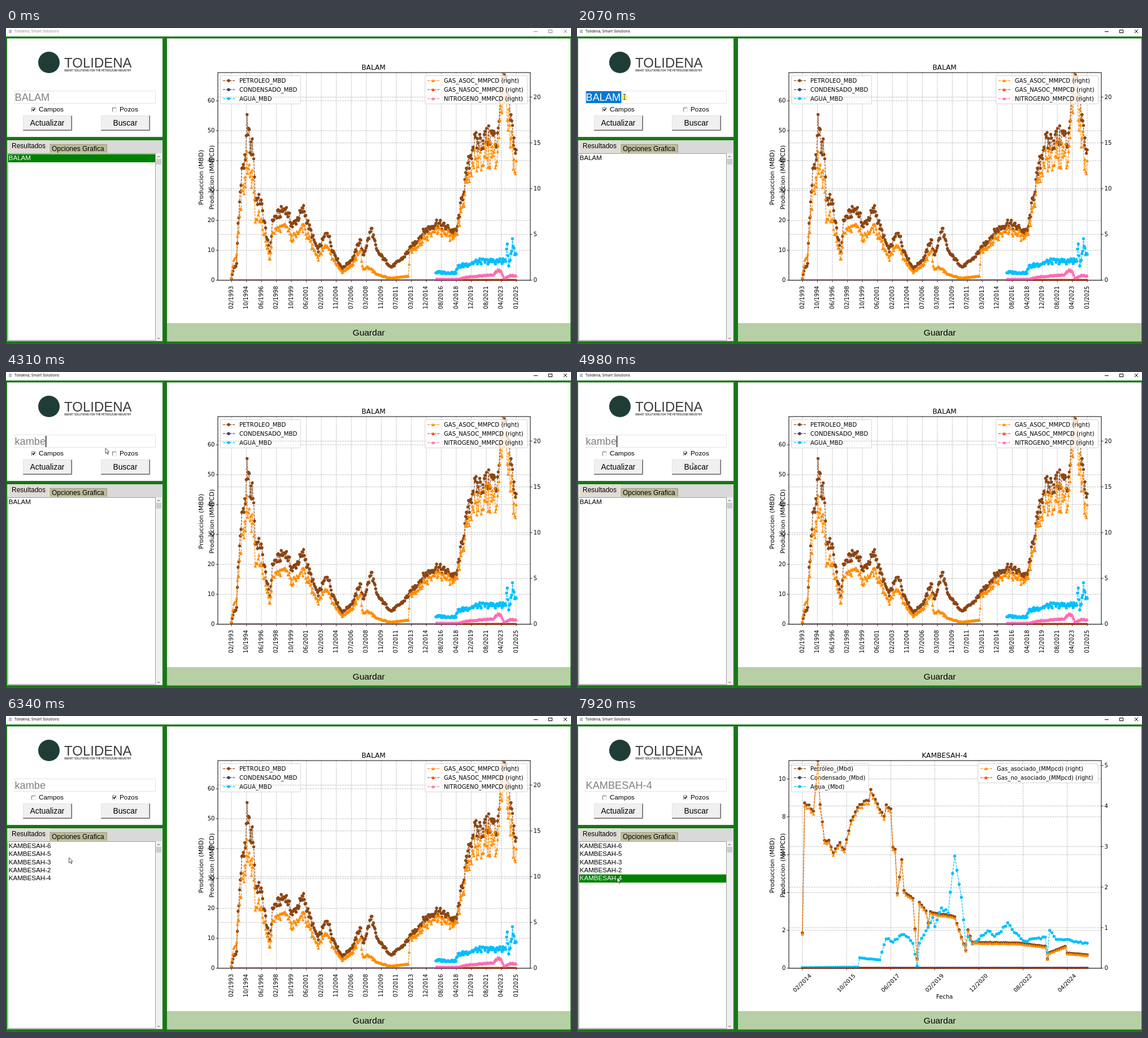
An HTML page with a canvas that plays this animation: 1000 px wide and 560 px high, repeating every 8 s.

```html
<!DOCTYPE html>
<html lang="es">
<head>
<meta charset="utf-8">
<style>
html, body { margin: 0; width: 100%; height: 100%; overflow: hidden; background: #fff; }
canvas { display: block; width: 1000px; height: 560px; }
</style>
</head>
<body>
<canvas id="stage" width="1000" height="560"></canvas>
<script>
const c = document.getElementById('stage').getContext('2d');
const LOOP = 8000, L = 375, R = 928, T = 79, B = 447, X0 = 399, SPAN = 504;
const UI = '"Liberation Sans", Arial, sans-serif', PLOT = '"DejaVu Sans", sans-serif';
const BROWN = '#8b4513', NAVY = '#483d6b', CYAN = '#00bfff', ORANGE = '#ff8c00', RED = '#ff4500', PINK = '#ff69b4';

function rect(x, y, w, h, fill) { c.fillStyle = fill; c.fillRect(x, y, w, h); }
function frame(x, y, w, h, color) { c.strokeStyle = color; c.lineWidth = 1; c.strokeRect(x + .5, y + .5, w - 1, h - 1); }
function disc(x, y, r, fill) { c.fillStyle = fill; c.beginPath(); c.arc(x, y, r, 0, 7); c.fill(); }
function line(points, color, width = 1, dash = []) {
  c.strokeStyle = color; c.lineWidth = width; c.setLineDash(dash);
  c.beginPath(); points.forEach(p => c.lineTo(p[0], p[1])); c.stroke(); c.setLineDash([]);
}
function text(s, x, y, size, { color = '#000', font = UI, align = 'left', weight = '', turn = 0 } = {}) {
  c.save(); c.translate(x, y); c.rotate(turn);
  c.font = `${weight} ${size}px ${font}`; c.fillStyle = color;
  c.textAlign = align; c.textBaseline = 'middle';
  c.fillText(s, 0, 0); c.restore();
}
const plotText = (s, x, y, size, align, turn) => text(s, x, y + .8, size, { font: PLOT, align, turn });

// Value in column n of sorted keys, linear between them
function at(keys, x, n = 1) {
  const i = keys.findIndex(k => k[0] >= x);
  if (i < 0) return keys[keys.length - 1][n];
  if (i === 0) return keys[0][n];
  const a = keys[i - 1], b = keys[i];
  return a[n] + (b[n] - a[n]) * (x - a[0]) / (b[0] - a[0]);
}
const noise = (i, seed) => { const v = Math.sin(i * 12.9898 + seed * 78.233) * 43758.5453; return v - Math.floor(v) - .5; };
const months = n => Array.from({ length: n }, (_, i) => X0 + i * SPAN / (n - 1));
const scatter = (xs, height, seed, rough) => xs.map((x, i) => [x, B - height(x, i) * (1 + rough * noise(i, seed))]);
const zero = xs => xs.map(x => [x, B]);

// Field: heights in px above the axis by x
const fieldTrend = [[399, 3], [403, 23], [408, 24], [411, 105], [419, 208], [424, 206], [427, 288], [432, 235], [438, 235],
  [441, 145], [451, 140], [467, 45], [472, 108], [495, 128], [507, 96], [527, 126], [535, 98], [552, 52], [569, 88], [577, 56],
  [595, 20], [615, 40], [627, 74], [632, 42], [647, 92], [656, 52], [682, 23], [703, 40], [740, 86], [762, 102], [797, 84],
  [810, 162], [826, 240], [862, 258], [868, 240], [880, 372], [891, 300], [903, 221]];
const gasShare = [[408, 1.6], [411, .78], [628, .74], [630, .5], [646, .22], [683, .17], [713, .15], [714, .88]];
const waterTrend = [[760, 14], [796, 13], [800, 24], [835, 33], [884, 34], [887, 58], [890, 27], [897, 69], [900, 45], [903, 48]];
const nitroTrend = [[760, 2], [800, 2], [815, 6], [862, 10], [870, 19], [877, 15], [881, 4], [893, 9], [903, 8]];
const all = months(384), late = all.filter(x => x >= 760);
const oil1 = scatter(all, x => at(fieldTrend, x), 1, .16);
const gas1 = scatter(all, (x, i) => (B - oil1[i][1]) * at(gasShare, x), 2, .13);

// Well: heights by month number
const wellTrend = [[0, 63], [1, 295], [5, 280], [7, 365], [8, 289], [10, 225], [12, 225], [14, 205], [17, 223], [19, 209], [22, 260],
  [26, 291], [30, 296], [31, 314], [37, 267], [38, 287], [40, 285], [41, 213], [42, 211], [43, 134], [45, 191], [46, 137], [50, 123],
  [52, 17], [53, 117], [56, 102], [57, 80], [58, 100], [69, 91], [74, 32], [75, 68], [77, 46], [97, 45], [110, 39], [111, 17],
  [112, 28], [119, 39], [120, 27], [129, 24]];
const seepTrend = [[0, 1], [25, 2], [26, 18], [35, 15], [38, 53], [41, 47], [46, 61], [50, 45], [52, 4], [53, 44], [59, 89], [60, 73],
  [63, 108], [66, 98], [69, 202], [72, 125], [74, 42], [75, 57], [77, 42], [84, 68], [87, 55], [93, 78], [100, 48], [110, 55],
  [111, 28], [112, 66], [115, 53], [129, 44]];
const wellMonths = months(130);
const oil2 = scatter(wellMonths, (x, i) => at(wellTrend, i), 5, .02);
const gas2 = oil2.map(([x, y]) => [x, B - (B - y) * .985 + 1]);

// Labels 20 records apart; each slip is a month without a record
function dates(count, year, slips) {
  return Array.from({ length: count }, (_, k) => {
    const m = 1 + 20 * k + slips.filter(s => k >= s).length;
    return String(m % 12 + 1).padStart(2, '0') + '/' + (year + Math.floor(m / 12));
  });
}

const field = {
  title: 'BALAM', left: [10, 5.3, 60], right: [5, 16.23, 20], turn: -Math.PI / 2, dateY: 477, gap: 26.53,
  dates: dates(20, 1993, [7, 13, 19]),
  series: [['PETROLEO_MBD', BROWN, oil1], ['CONDENSADO_MBD', NAVY, []],
    ['AGUA_MBD', CYAN, scatter(late, x => at(waterTrend, x), 3, .3)]],
  series2: [['GAS_ASOC_MMPCD (right)', ORANGE, gas1], ['GAS_NASOC_MMPCD (right)', RED, zero(late.filter(x => x > 785))],
    ['NITROGENO_MMPCD (right)', PINK, scatter(late, x => at(nitroTrend, x), 4, .25)]],
  legend: [379, 142], legend2: [741, 181], idle: true
};
const well = {
  title: 'KAMBESAH-4', left: [2, 33.55, 10], right: [1, 71.9, 5], turn: -Math.PI / 4, dateY: 473, gap: 78.1,
  dates: dates(7, 2014, [4, 4]), xlabel: 'Fecha',
  series: [['Petróleo_(Mbd)', BROWN, oil2], ['Condensado_(Mbd)', NAVY, zero(wellMonths)],
    ['Agua_(Mbd)', CYAN, scatter(wellMonths, (x, i) => at(seepTrend, i), 6, .07)]],
  series2: [['Gas_asociado_(MMpcd) (right)', ORANGE, gas2], ['Gas_no_asociado_(MMpcd) (right)', RED, zero(wellMonths)]],
  legend: [379, 137], legend2: [709, 213]
};

function marker(x, y, color, triangle) {
  if (!triangle) return disc(x, y, 2.7, color);
  c.fillStyle = color; c.beginPath();
  c.moveTo(x, y - 2.9); c.lineTo(x + 2.9, y + 2.7); c.lineTo(x - 2.9, y + 2.7); c.fill();
}
function plot(series, triangle) {
  c.save(); c.beginPath(); c.rect(L, T, R - L, B - T + 1); c.clip();
  for (const [, color, points] of series) {
    line(points, color, 1.2, [4, 1.7]);
    points.forEach(p => marker(p[0], p[1], color, triangle));
  }
  c.restore();
}
function legend([x, w], series, triangle) {
  c.beginPath(); c.roundRect(x + .5, 84.5, w, series.length * 16 + 2, 2);
  c.fillStyle = 'rgba(255,255,255,.8)'; c.fill();
  c.strokeStyle = 'rgba(204,204,204,.8)'; c.lineWidth = 1; c.stroke();
  series.forEach(([name, color], i) => {
    const y = 93.3 + 15.9 * i;
    line([[x + 5, y], [x + 26, y]], color, 1.2, [4, 1.7]);
    marker(x + 15, y, color, triangle);
    plotText(name, x + 34, y, 10.15);
  });
}
function axis([step, scale, max], edge, side, align) {
  for (let v = 0; v <= max; v += step) {
    const y = B - v * scale;
    line([[L, y], [R, y]], '#b0b0b0', .8, [3, 1.4]);
    line([[edge, y], [edge + 3.5 * side, y]], '#000', .8);
    plotText(v, edge + 5.5 * side, y, 10.1, align);
  }
}
function chart(d) {
  d.dates.forEach((s, i) => {
    const x = X0 + d.gap * i;
    line([[x, B], [x, T]], '#b0b0b0', .8, [3, 1.4]);
    line([[x, B], [x, B + 3.5]], '#000', .8);
    plotText(s, x, d.dateY, 9.9, 'center', d.turn);
  });
  axis(d.left, L, -1, 'right');
  if (d.idle) {
    line([[X0, 445.5], [X0 + SPAN, 445.5]], '#8d9cc0');
    line([[X0, 446.5], [760, 446.5]], PINK);
  }
  plot(d.series, false);
  legend(d.legend, d.series, false);
  axis(d.right, R, 1, 'left');
  plot(d.series2, true);
  frame(L - .5, T - .5, R - L + 1, B - T + 1, '#000');
  legend(d.legend2, d.series2, true);
  plotText(d.title, 650.5, 70.3, 12.2, 'center');
  plotText('Produccion (MBD)', 346, 264, 11, 'center', -Math.PI / 2);
  plotText('Produccion (MMPCD)', 365, 264, 11, 'center', -Math.PI / 2);
  if (d.xlabel) plotText(d.xlabel, 650.5, 498, 10.1, 'center');
}

function button(x, label, down) {
  rect(x, 155, 87, 27, '#f0f0f0');
  frame(x, 155, 87, 27, down ? '#696969' : '#e3e3e3');
  line([[x, 181.5], [x + 86.5, 181.5], [x + 86.5, 155]], down ? '#fff' : '#696969');
  line([[x + 1, 180.5], [x + 85.5, 180.5], [x + 85.5, 156]], down ? '#e3e3e3' : '#a0a0a0');
  const shift = down ? 1 : 0;
  text(label, x + 43 + shift, 169 + shift, 13.9, { align: 'center' });
}
function check(x, label, on) {
  rect(x, 141, 8, 8, '#fff');
  line([[x + .5, 148], [x + .5, 141.5], [x + 7, 141.5]], '#696969');
  line([[x + 1, 148.5], [x + 7.5, 148.5], [x + 7.5, 141]], '#e3e3e3');
  if (on) line([[x + 2, 144], [x + 3.5, 146.3], [x + 6.5, 142.8]], '#000', 1.4);
  text(label, x + 13, 145.2, 11.8);
}

function titleBar(t) {
  const color = t < 1940 ? '#8a8a8a' : '#000';
  rect(0, 0, 1000, 15, '#fff');
  rect(5, 3, 5, 6, '#b4c0cc');
  text('Tolidena, Smart Solutions', 15, 6.2, 6.7, { color, font: '"Open Sans", sans-serif' });
  line([[934, 6.5], [941, 6.5]], color);
  frame(960, 3, 7, 6, color);
  line([[987, 3], [993, 9]], color);
  line([[993, 3], [987, 9]], color);
}

function entry(t) {
  const typed = [3070, 3110, 3180, 3440, 3580].filter(k => t >= k).length;
  const selected = t >= 2070 && t < 3070;
  const value = t >= 7920 ? 'KAMBESAH-4' : typed ? 'kambe'.slice(0, typed) : 'BALAM';
  rect(15, 111, 250, 23, '#fff');
  frame(15, 111, 250, 23, '#e3e3e3');
  if (selected) rect(16, 112, 62.5, 21, '#0078d7');
  text(value, 15.5, 124, 18.2, { color: selected ? '#fff' : '#808080' });
  c.font = `18.2px ${UI}`;
  const end = 15.5 + c.measureText(value).width;
  if (t >= 2140 && t < 5530 && (t - 2140) % 900 < 600) rect(Math.round(end), 113, 1.3, 20, '#000');
}

function results(t) {
  rect(2, 199, 275, 356, '#d9d9d9');
  rect(4, 199, 72, 22, '#e0dcd5');
  line([[4.5, 221], [4.5, 199.5], [76.5, 199.5], [76.5, 221]], '#eeebe7');
  rect(77, 206, 102, 15, '#bdbb98');
  line([[77, 206.5], [178.5, 206.5], [178.5, 221]], '#999779');
  text('Resultados', 10, 209.5, 12);
  text('Opciones Grafica', 81, 214.6, 12);
  rect(3, 222, 262, 332, '#fff');
  frame(3, 222, 262, 332, '#a0a0a0');
  rect(265, 222, 11, 332, '#f0f0f0');
  rect(265.5, 232, 9.5, 10, '#cdcdcd');
  line([[268, 229], [270, 227], [272, 229]], '#505050');
  line([[268, 549], [270, 551], [272, 549]], '#505050');
  const rows = t < 5530 ? ['BALAM'] : [6, 5, 3, 2, 4].map(n => 'KAMBESAH-' + n);
  const picked = t < 2070 ? 0 : t >= 7920 ? 4 : -1;
  rows.forEach((s, i) => {
    const y = 230.8 + 14.3 * i;
    if (i === picked) rect(4, y - 7.2, 260, 14.4, '#008000');
    text(s, 4.7, y, 11.6, { color: i === picked ? '#fff' : '#000' });
  });
}

const track = [[70, 935, 546], [840, 112, 122], [1100, 62, 121], [1430, 76, 121], [1620, 84, 122], [4000, 84, 122],
  [4310, 176, 135], [4500, 191, 143], [4640, 191, 143], [5100, 209, 167], [5790, 209, 167], [6570, 71, 286]];
const clicks = [[1940, 2140], [4500, 4640], [5180, 5250], [6970, 7110]];

function pointer(t) {
  if (t < 70 || (t >= 2140 && t < 4000)) return;
  const x = at(track, t), y = at(track, t, 2);
  if (clicks.some(([a, b]) => t >= a && t < b)) disc(x, y + .5, 5.5, 'rgba(255,240,60,.75)');
  if (x > 15 && x < 265 && y > 111 && y < 133) {
    line([[x, y - 4], [x, y + 4]], '#444');
    line([[x - 2, y - 4.5], [x + 2, y - 4.5]], '#444');
    line([[x - 2, y + 4.5], [x + 2, y + 4.5]], '#444');
    return;
  }
  const shape = [[0, 0], [0, 9.2], [2.2, 7.3], [3.7, 10.8], [5.2, 10.1], [3.7, 6.8], [6.6, 6.7]];
  c.beginPath(); shape.forEach(p => c.lineTo(x + p[0], y + p[1])); c.closePath();
  c.fillStyle = '#fff'; c.fill();
  c.strokeStyle = '#222'; c.lineWidth = .8; c.stroke();
}

function draw(t) {
  rect(0, 15, 1000, 545, '#1b7a1b');
  line([[281.5, 15], [281.5, 560]], '#166416');
  line([[0, 196.5], [278, 196.5]], '#166416');
  titleBar(t);
  rect(2, 18.5, 275, 174.5, '#fff');
  disc(76, 61, 19, '#1f3d36');
  text('TOLIDENA', 103, 63, 24, { color: '#3a3a3a' });
  text('SMART SOLUTIONS FOR THE PETROLEUM INDUSTRY', 103, 75.5, 4.9, { color: '#333', font: 'Roboto, sans-serif', weight: 500 });
  entry(t);
  check(45, 'Campos', t < 4570);
  check(188, 'Pozos', t >= 4570);
  button(30, 'Actualizar');
  button(168, 'Buscar', t >= 5180 && t < 5530);
  results(t);
  rect(285, 18.5, 714, 505, '#fff');
  chart(t < 7920 ? field : well);
  rect(285, 523, 714, 32.5, '#b7cfa4');
  text('Guardar', 642, 540.6, 15.5, { align: 'center' });
  pointer(t);
}

function tick(now) {
  draw(now % LOOP);
  requestAnimationFrame(tick);
}
requestAnimationFrame(tick);
</script>
</body>
</html>
```
